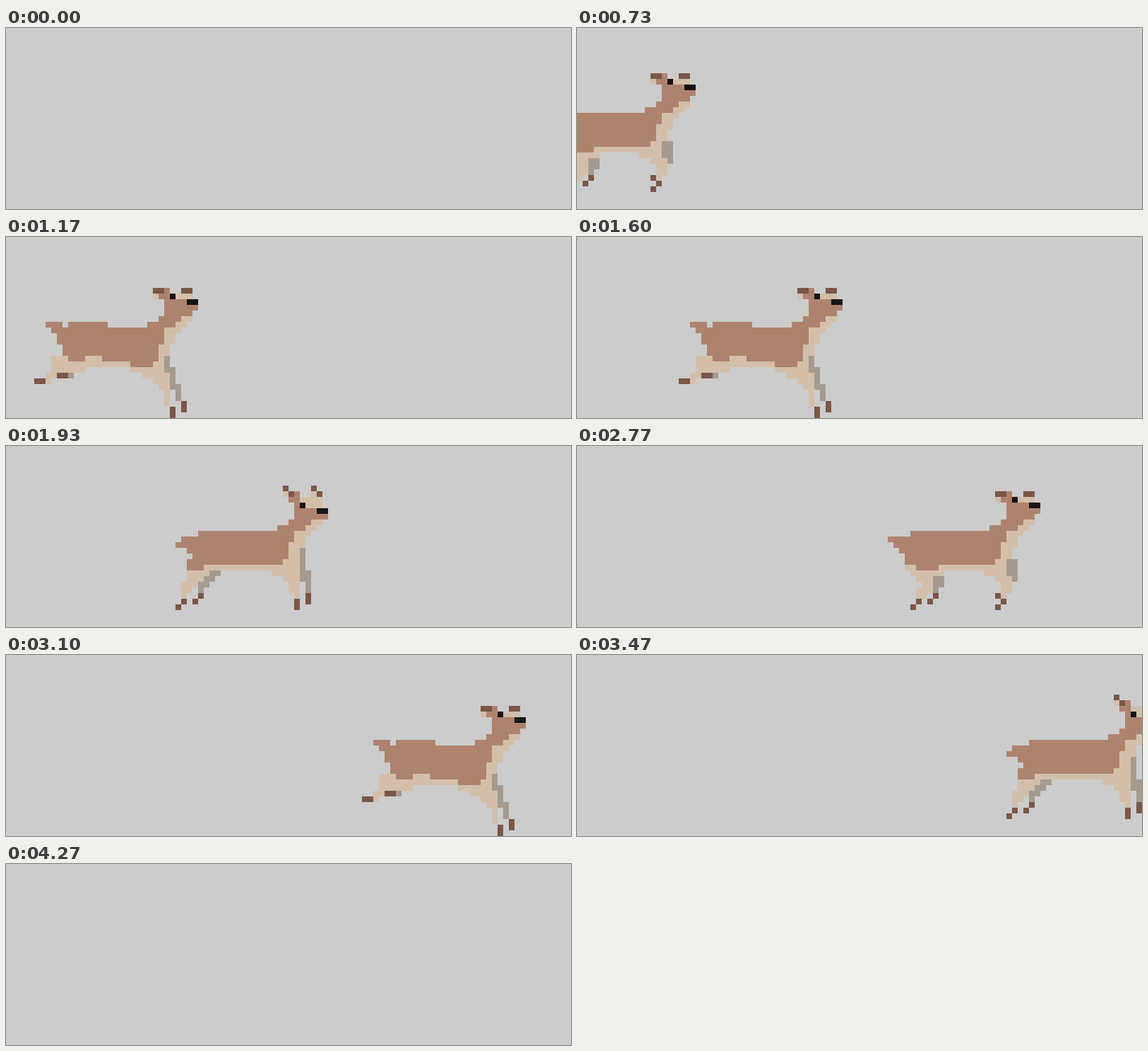
Write an HTML page with a canvas that moves like this. It is 800 px wide and 256 px high and loops after 4.7 s.

```html
<!DOCTYPE html>
<html lang="en">
<head>
<meta charset="utf-8">
<title>Running deer</title>
<style>
  html, body { margin: 0; width: 100%; height: 100%; overflow: hidden; background: #ccc; }
  canvas { display: block; }
</style>
</head>
<body>
<canvas id="stage" width="800" height="256"></canvas>
<script>
const ctx = document.getElementById('stage').getContext('2d');
const CELL = 8, COLS = 100, ROWS = 32, LOOP = 4700, HOLD = 3;
const BROWN = '#ae836d', TAN = '#d3bfa9', DARK = '#7b5647', GREY = '#a59a8f', BLACK = '#171414';

const mix = (a, b, k) => a + (b - a) * k;

function box(ink, x, y, w = 1, h = 1) {
  ctx.fillStyle = ink;
  ctx.fillRect(x, y, w, h);
}

// Outline through key rows [y, first column, last column], snapped to the grid.
function shape(ink, ...keys) {
  for (let i = 1; i < keys.length; i++) {
    const [y0, l0, r0] = keys[i - 1], [y1, l1, r1] = keys[i];
    for (let y = y0; y <= y1; y++) {
      const k = (y - y0) / (y1 - y0);
      const l = Math.round(mix(l0, l1, k)), r = Math.round(mix(r0, r1, k));
      box(ink, l, y, r - l + 1);
    }
  }
}

// Thin slanted line: fills every cell it touches.
function line(ink, x0, y0, x1, y1) {
  const slope = (x1 - x0) / (y1 - y0);
  for (let y = y0; y < y1; y++) {
    const a = x0 + slope * (y - y0), b = a + slope;
    const l = Math.floor(Math.min(a, b));
    box(ink, l, y, Math.ceil(Math.max(a, b)) - l);
  }
}

function lowered(dy, paint) {
  ctx.save();
  ctx.translate(0, dy);
  paint();
  ctx.restore();
}

// Hoof trailing down and back from its first cell.
const hoof = (x, y) => line(DARK, x + 1, y, x - 1, y + 2);
const uprightHoof = (x, y) => box(DARK, x, y, 1, 2);

function ear(x, up) {
  if (up) line(DARK, x, 6, x + 2, 8);
  else box(DARK, x, 8, 2);
  box(TAN, x, up ? 7 : 9);
}

function head(up) {
  const brow = up ? 8 : 9;
  ear(23, up);
  ear(28, up);
  box(TAN, 26, brow, 4, 10 - brow);
  box(BROWN, 25, brow - 1, 1, 11 - brow);
  box(BROWN, 24, brow);
  box(BROWN, 25, 10, 5, 3);
  box(BROWN, 30, 11);
  box(BLACK, 26, 9);
  box(BLACK, 29, 10, 2);
}

function neck() {
  shape(BROWN, [13, 24, 27], [15, 20, 25]);
  shape(TAN, [13, 28, 29], [15, 25.3, 26.8], [19, 23.6, 24.9]);
}

function torso() {
  shape(BROWN, [15, 8, 24], [20, 7, 22.4]);
  neck();
}

function foreleg(belly, foot) {
  box(TAN, 23, 20, 3);
  box(TAN, belly, 21, 26 - belly);
  shape(TAN, [22, 21, 25], [23, 23, 25], [25, 24, 25], [26, foot, foot]);
}

function stretch() {
  head(true);
  torso();
  shape(BROWN, [14, 3, 5], [17, 6, 8]);
  box(BROWN, 8, 21, 7);
  box(TAN, 23, 20, 3);
  box(TAN, 15, 21, 11);
  shape(TAN, [22, 20, 25], [24, 24, 26], [28, 27, 27]);
  line(DARK, 27, 29, 29, 31);
  line(GREY, 26, 19, 30, 27);
  line(DARK, 30, 27, 32, 29);
  shape(TAN, [21, 5, 7], [22, 5, 11], [25, 4, 5]);
  hoof(4, 26);
  line(GREY, 10, 23, 8, 25);
  hoof(7, 25);
}

function land() {
  lowered(1, () => { head(false); neck(); });
  shape(BROWN, [15, 4.4, 6], [18, 6.4, 8]);
  box(BROWN, 8, 15, 7);
  shape(BROWN, [16, 7, 24.4], [21, 7, 22.6]);
  box(BROWN, 19, 22, 4);
  box(TAN, 11, 21, 3);
  box(TAN, 5, 22, 14);
  shape(TAN, [21, 5, 7], [23, 5, 10], [24, 4, 5], [25, 4, 4]);
  box(GREY, 8, 24);
  box(DARK, 6, 24, 2);
  box(DARK, 2, 25, 2);
  shape(TAN, [21, 24, 24], [22, 23, 24], [23, 19, 25], [26, 24.4, 25], [29, 25, 25]);
  line(GREY, 25, 21, 28, 29);
  uprightHoof(28, 29);
  uprightHoof(26, 30);
}

function gather() {
  head(false);
  torso();
  shape(BROWN, [16, 4, 8], [19, 7, 8]);
  box(BROWN, 9, 21, 4);
  shape(TAN, [21, 7, 8], [22, 8, 13], [24, 9.6, 11.2], [26, 8.6, 10.2]);
  box(GREY, 12, 23, 2, 2);
  box(GREY, 12, 25);
  hoof(12, 26);
  hoof(9, 27);
  foreleg(13, 24);
  box(GREY, 25, 20, 2, 3);
  box(GREY, 26, 23);
  box(DARK, 23, 26);
  hoof(24, 27);
}

function push() {
  lowered(1, () => head(false));
  torso();
  shape(BROWN, [16, 5, 8], [17, 4, 8], [19, 7, 8]);
  box(BROWN, 7, 21, 5);
  shape(TAN, [22, 7, 12], [25, 7, 9], [29, 7, 7]);
  uprightHoof(7, 30);
  line(GREY, 14, 23, 11, 28);
  hoof(11, 28);
  foreleg(12, 24);
  hoof(24, 27);
  box(GREY, 26, 19, 1, 5);
  box(GREY, 27, 21, 1, 4);
  uprightHoof(26, 25);
}

function rise() {
  lowered(1, () => head(true));
  torso();
  shape(BROWN, [16, 5, 8], [17, 4, 8], [18, 6, 8]);
  box(BROWN, 6, 20, 3, 2);
  shape(TAN, [22, 6, 9], [26, 4.6, 5]);
  shape(GREY, [22, 10, 11.4], [25, 7.5, 8.4]);
  hoof(8, 26);
  hoof(5, 27);
  foreleg(9, 25);
  uprightHoof(25, 27);
  box(GREY, 26, 18, 1, 6);
  box(GREY, 27, 22, 1, 4);
  uprightHoof(27, 26);
}

const poses = [stretch, land, gather, push, rise];

// Thirty steps a second, with step times rounded to 10 ms.
function stepAt(t) {
  const rest = t % 100;
  return 3 * Math.floor(t / 100) + (rest >= 30) + (rest >= 70);
}

function draw(t) {
  const step = stepAt(t);
  ctx.setTransform(CELL, 0, 0, CELL, 0, 0);
  box('#ccc', 0, 0, COLS, ROWS);
  ctx.translate(step - 32, 0);
  poses[Math.floor(step / HOLD) % poses.length]();
}

const start = performance.now();
function tick() {
  draw((performance.now() - start) % LOOP);
  requestAnimationFrame(tick);
}
tick();
</script>
</body>
</html>
```
